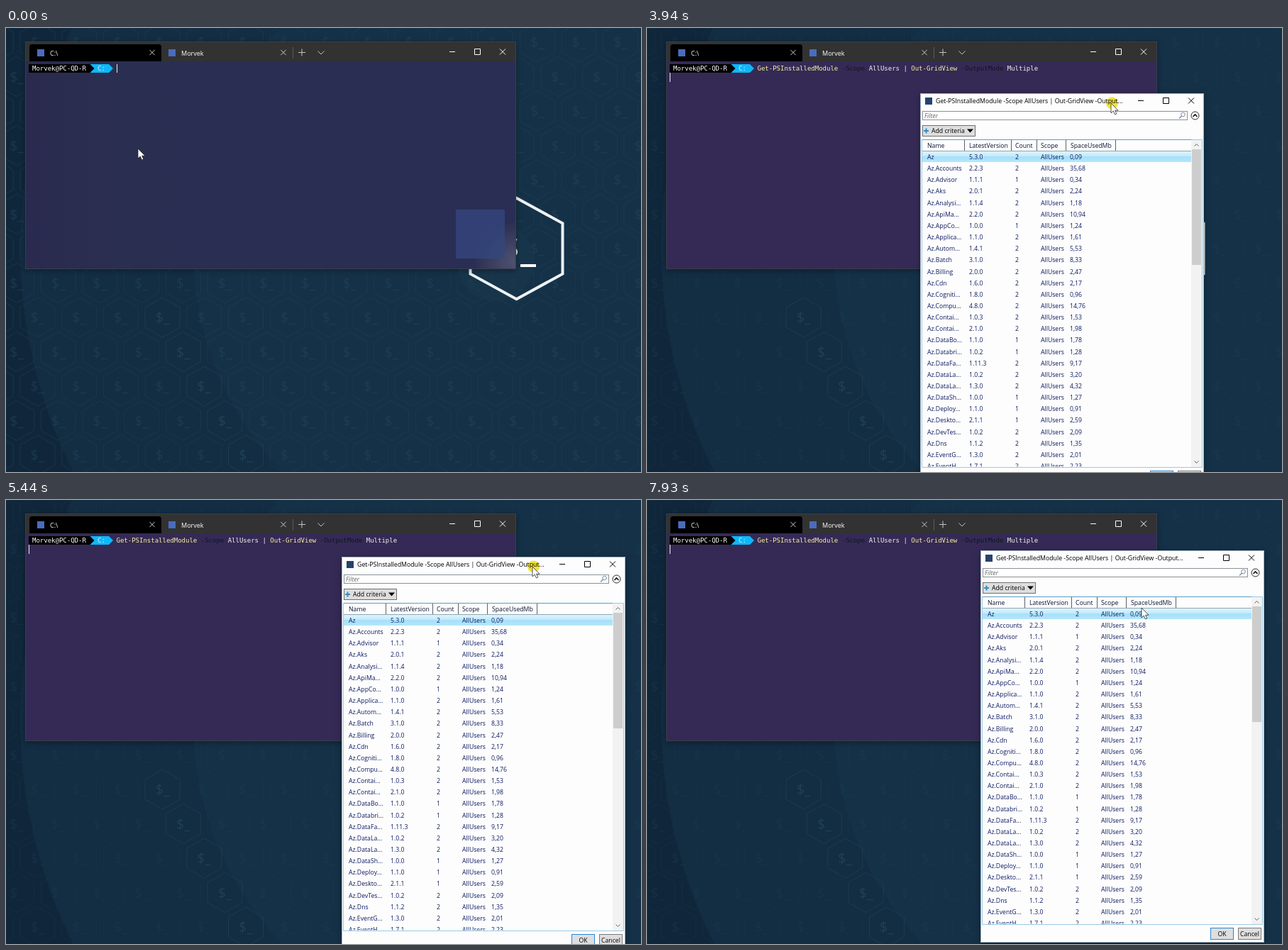
An HTML page that plays this animation: 895 by 626 pixels, repeating every 8 s.

```html
<!DOCTYPE html>
<html lang="en">
<head>
<meta charset="utf-8">
<title>Terminal and grid view</title>
<style>
  html, body { margin: 0; width: 100%; height: 100%; overflow: hidden; background: #10273b; }
  svg { display: block; }
  text { font-family: "Open Sans", "Noto Sans", sans-serif; font-size: 8.7px; white-space: pre; }
  .mono { font-family: "DejaVu Sans Mono", "Noto Sans Mono", monospace; font-size: 9px; }
  .line { fill: none; stroke-width: 1; }
</style>
</head>
<body>
<svg id="stage" width="895" height="626" viewBox="0 0 895 626">
  <defs>
    <linearGradient id="pick" x2="0" y2="1">
      <stop offset="0" stop-color="#def4fd"/><stop offset=".45" stop-color="#c2eafb"/>
      <stop offset=".5" stop-color="#a6e0fa"/><stop offset="1" stop-color="#b4e6fb"/>
    </linearGradient>
    <linearGradient id="acrylic">
      <stop offset="0" stop-color="#292c50"/><stop offset=".5" stop-color="#292f52"/>
      <stop offset="1" stop-color="#2c2f54"/>
    </linearGradient>
    <radialGradient id="glow">
      <stop offset="0" stop-color="#73748a" stop-opacity=".5"/>
      <stop offset="1" stop-color="#73748a" stop-opacity="0"/>
    </radialGradient>
    <filter id="shade" x="-10%" y="-10%" width="120%" height="120%">
      <feDropShadow dx="0" dy="2" stdDeviation="4" flood-opacity=".35"/>
    </filter>
    <clipPath id="term"><rect x="27" y="47" width="692" height="293"/></clipPath>
    <clipPath id="list"><rect x="3" y="66" width="380" height="460.5"/></clipPath>
  </defs>
</svg>
<script>
const LOOP = 8000;
const USER = 'Morvek', HOST = 'PC-QD-R';
const CHAR = 5.41, LINE_X = 155.5;
const YELLOW = '#f9f1a5', DIM = '#141726', PALE = '#f2f2f2';
const COMMAND = [['Get-PSInstalledModule', YELLOW], [' -Scope', DIM], [' AllUsers | ', PALE],
  ['Out-GridView', YELLOW], [' -OutputMode', DIM], [' Multiple', PALE]];
const MODULES = `Az 5.3.0 2 0,09|Az.Accounts 2.2.3 2 35,68|Az.Advisor 1.1.1 1 0,34|Az.Aks 2.0.1 2 2,24
Az.Analysi... 1.1.4 2 1,18|Az.ApiMa... 2.2.0 2 10,94|Az.AppCo... 1.0.0 1 1,24|Az.Applica... 1.1.0 2 1,61
Az.Autom... 1.4.1 2 5,53|Az.Batch 3.1.0 2 8,33|Az.Billing 2.0.0 2 2,47|Az.Cdn 1.6.0 2 2,17
Az.Cogniti... 1.8.0 2 0,96|Az.Compu... 4.8.0 2 14,76|Az.Contai... 1.0.3 2 1,53|Az.Contai... 2.1.0 2 1,98
Az.DataBo... 1.1.0 1 1,78|Az.Databri... 1.0.2 1 1,28|Az.DataFa... 1.11.3 2 9,17|Az.DataLa... 1.0.2 2 3,20
Az.DataLa... 1.3.0 2 4,32|Az.DataSh... 1.0.0 1 1,27|Az.Deploy... 1.1.0 1 0,91|Az.Deskto... 2.1.1 1 2,59
Az.DevTes... 1.0.2 2 2,09|Az.Dns 1.1.2 2 1,35|Az.EventG... 1.3.0 2 2,01|Az.EventH... 1.7.1 2 2,23`
  .split(/[|\n]/).map(row => row.split(' '));

const stage = document.getElementById('stage');

function add(parent, tag, attrs = {}, content) {
  const node = document.createElementNS('http://www.w3.org/2000/svg', tag);
  for (const key in attrs) node.setAttribute(key, attrs[key]);
  if (content !== undefined) node.textContent = content;
  parent.append(node);
  return node;
}
const group = (parent, attrs) => add(parent, 'g', attrs);
const box = (parent, x, y, width, height, fill, more) =>
  add(parent, 'rect', { x, y, width, height, fill, ...more });
const stroke = (parent, d, color, more) =>
  add(parent, 'path', { d, class: 'line', stroke: color, ...more });
const label = (parent, x, y, content, fill, more) =>
  add(parent, 'text', { x, y, fill, ...more }, content);
const cross = (x, y, r) => `M${x - r} ${y - r}l${2 * r} ${2 * r}m0 ${-2 * r}l${-2 * r} ${2 * r}`;
const show = (node, on) => node.setAttribute('visibility', on ? 'visible' : 'hidden');

// x is whole and y a half pixel, so that the lines stay crisp
function windowButtons(parent, x, y, color) {
  stroke(parent, `M${x - 4} ${y}h8`, color);
  stroke(parent, `M${x + 31.5} ${y - 4}h8v8h-8z`, color);
  stroke(parent, cross(x + 71, y, 4), color);
}

function hexPath(x, y, w, h) {
  return `M${x} ${y - h}l${w} ${h / 2}v${h}l${-w} ${h / 2}l${-w} ${-h / 2}v${-h}z`;
}

// Wallpaper: rings around the large hexagon, and a honeycomb of small ones
function drawWallpaper() {
  box(stage, 0, 0, 895, 626, '#10273b');
  add(stage, 'circle', { cx: 720, cy: 311, r: 700, fill: '#132d43' });
  add(stage, 'circle', { cx: 720, cy: 311, r: 457, fill: '#153147' });
  const faint = group(stage), bright = group(stage);
  for (let row = 0; row < 13; row++) {
    const y = 602 - row * 48.5;
    for (let col = -7; col < 12; col++) {
      const x = 338 + col * 58.7 + (row % 2 ? -29.4 : 0);
      const lit = row < 5 && col === -Math.floor(row / 2);
      const parent = lit ? bright : faint;
      const opacity = lit ? .8 : .55;
      stroke(parent, hexPath(x, y, 24.5, 28), '#204056', { opacity, 'stroke-width': 1.5 });
      label(parent, x, y + 7, '$_', '#23455c',
        { opacity, 'text-anchor': 'middle', style: 'font-size:20px' });
    }
  }
  add(stage, 'circle', { cx: 690, cy: 330, r: 55, fill: '#1a374e', opacity: .6 });
  stroke(stage, hexPath(719.5, 311, 65, 71.3), '#eef1f3', { style: 'stroke-width:4' });
  label(stage, 724, 325, '$', '#eef1f3', { 'text-anchor': 'end', style: 'font-size:44px' });
  box(stage, 725, 333, 22, 4, '#fff');
  return faint;
}

function commandLine(parent, parts) {
  const node = label(parent, LINE_X, 60, '', PALE, { class: 'mono' });
  for (const [content, fill] of parts) add(node, 'tspan', { fill }, content);
  return node;
}

function drawTerminal() {
  const term = group(stage, { filter: 'url(#shade)' });
  box(term, 27, 19, 692, 321, '#333');
  const focused = group(term, { 'clip-path': 'url(#term)' });
  box(focused, 27, 47, 692, 293, 'url(#acrylic)');
  add(focused, 'circle', { cx: 716, cy: 330, r: 55, fill: 'url(#glow)' });
  box(focused, 634, 256, 69, 69, '#34477c', { opacity: .8 });
  const blurred = group(term);
  box(blurred, 27, 47, 692, 293, '#342955');
  box(blurred, 634, 256, 69, 69, '#383468');
  stroke(term, 'M27.5 47V339.5H718.5V19.5H27.5Z', '#3b3d4c');

  add(term, 'path', { d: 'M33 47V27q0-4 4-4H215q4 0 4 4V47z', fill: '#000' });
  [[44, 62, 'C:\\', 206], [229, 247, USER, 391]].forEach(([icon, x, name, close]) => {
    box(term, icon, 30, 10, 10, '#496cbd');
    label(term, x, 38.5, name, '#fff', { style: 'font-size:9px' });
    stroke(term, cross(close, 34.5, 3.6), '#ccc');
  });
  stroke(term, 'M404.5 27V43', '#5a5a5a');
  stroke(term, 'M412 34.5h10m-5-5v10M439.5 32.5l4.5 4.5 4.5-4.5', '#c4c4c4');
  windowButtons(term, 629, 33.5, '#fff');

  add(term, 'path', { d: 'M118 51H145L151 57 145 63H118z', fill: '#0bb8f9' });
  add(term, 'path', { d: 'M32 51H118.5L124.5 57 118.5 63H32z', fill: '#000' });
  label(term, 37, 60, `${USER}@${HOST}`, '#fff', { class: 'mono' });
  label(term, 129, 60, 'C:', '#e4f5fd', { class: 'mono' });

  const whole = COMMAND.map(part => part[0]).join('');
  const guess = n => commandLine(term, [[whole.slice(0, n), YELLOW], [whole.slice(n), DIM]]);
  const states = [guess(1), guess(2), commandLine(term, COMMAND)];
  const caret = box(term, 156, 51, 1, 12, '#eee');
  return { focused, blurred, states, caret };
}

function drawGrid() {
  const grid = group(stage);
  box(grid, 0, 0, 400, 553, '#fdfdfd', { filter: 'url(#shade)' });
  stroke(grid, 'M.5 .5H399.5V552.5H.5z', '#5d7f9c', { opacity: .6 });
  box(grid, 7, 6, 10, 10, '#26426b');
  label(grid, 22, 14, 'Get-PSInstalledModule -Scope AllUsers | Out-GridView -Output...', '#000',
    { style: 'font-size:8.78px' });
  windowButtons(grid, 311, 10.5, '#000');

  box(grid, 3.5, 25.5, 373, 12, '#fff', { stroke: '#8b9097' });
  label(grid, 6, 35, 'Filter', '#666', { 'font-style': 'italic' });
  add(grid, 'circle', { cx: 370.5, cy: 30, r: 2.8, class: 'line', stroke: '#7d8ba4' });
  stroke(grid, 'M368.5 32l-3.5 3.5', '#7d8ba4', { style: 'stroke-width:1.5' });
  add(grid, 'circle', { cx: 387.5, cy: 31.5, r: 5.5, class: 'line', stroke: '#222' });
  stroke(grid, 'M384.5 33l3-3 3 3', '#111', { style: 'stroke-width:1.6' });

  box(grid, 3.5, 45.5, 74, 15, '#dedede', { stroke: '#707070' });
  stroke(grid, 'M5 53h7m-3.5-3.5v7', '#2d8fd0', { style: 'stroke-width:2' });
  label(grid, 16, 56, 'Add criteria', '#000');
  add(grid, 'path', { d: 'M66 50.5h9l-4.5 5z', fill: '#000' });

  stroke(grid, 'M2.5 65.5H397.5V527.5H2.5z', '#9ccbe4');
  stroke(grid, 'M3 65.5H382', '#5b9cc4');
  stroke(grid, 'M3 81.5H382', '#8fa6b4');
  const columns = [10, 69, 134, 170, 212];
  ['Name', 'LatestVersion', 'Count', 'Scope', 'SpaceUsedMb'].forEach((name, i) =>
    label(grid, columns[i], 77, name, '#0a1330'));
  stroke(grid, [62.5, 128.5, 164.5, 205.5, 275.5].map(x => `M${x} 66V81`).join(''), '#5c6168');
  const list = group(grid, { 'clip-path': 'url(#list)' });
  box(list, 3, 82, 379, 15, 'url(#pick)');
  MODULES.forEach(([name, version, count, space], i) => {
    const y = Math.round(93 + i * 16.15);
    [name, version, count, 'AllUsers', space].forEach((cell, c) =>
      label(list, columns[c] - (c === 4 ? 1 : 0), y, cell, '#0c1a62'));
  });

  box(grid, 382, 66, 15, 461, '#f2f2f2');
  box(grid, 383, 79, 13, 163, '#cdcdcd');
  stroke(grid, 'M386.5 74.5l3-3 3 3M386.5 518.5l3 3 3-3', '#606060');

  [[324.5, 'OK', '#2f86d1'], [363.5, 'Cancel', '#7b7b7b']].forEach(([x, name, edge]) => {
    box(grid, x, 532.5, 32, 16, '#dedede', { stroke: edge });
    label(grid, x + 16, 544, name, '#000', { 'text-anchor': 'middle' });
  });
  return grid;
}

// Each move: start, end, number of steps, x and y reached
const GRID_START = [-169, -34];
const GRID_MOVES = [
  [3560, 3630, 2, 28, 40], [3870, 4010, 3, 430, 99], [4310, 4720, 7, 471, 90],
  [4930, 5440, 8, 473, 80], [5620, 5690, 2, 473, 76], [5940, 6310, 6, 472, 57],
  [6490, 6750, 4, 471, 68], [6930, 7050, 3, 470, 71]];
const POINTER_MOVES = [[7540, 7930, 7, 697, 152]];

function place(moves, t, x, y) {
  for (const [start, end, steps, toX, toY] of moves) {
    if (t < start) break;
    const part = (t - start) / (end - start);
    const step = t >= end ? steps : 1 + Math.floor(part * (steps - 1) + .1);
    const eased = 1 - (1 - step / steps) ** 2;
    x += (toX - x) * eased;
    y += (toY - y) * eased;
  }
  return [Math.round(x), Math.round(y)];
}

const faint = drawWallpaper();
const { focused, blurred, states, caret } = drawTerminal();
const grid = drawGrid();
const halo = add(stage, 'circle', { r: 8.5, fill: '#f3e43c', style: 'mix-blend-mode:multiply' });
const pointer = add(stage, 'path', { d: 'M0 0V14L3.2 11 5.5 16 7.8 15 5.6 10.2H10Z',
  fill: '#fff', stroke: '#111', 'stroke-width': .7 });

function setCaret(t) {
  const entered = t >= 2250;
  const typed = t < 620 ? 0 : t < 810 ? 1 : t < 1680 ? 2 : 76.7;
  caret.setAttribute('x', entered ? 32 : Math.round(156 + typed * CHAR));
  caret.setAttribute('y', entered ? 63 : 51);
  caret.setAttribute('height', entered ? 13 : 12);
  const off = [[1370, 1680], [2180, 2250], [2870, 3240]].some(([a, b]) => t >= a && t < b);
  show(caret, !off);
}

function draw(t) {
  const active = t < 3240, open = t >= 3490;
  show(focused, active);
  show(blurred, !active);
  faint.setAttribute('opacity', t < 3870 ? 1 : .55);
  const state = t < 620 ? -1 : t < 810 ? 0 : t < 1680 ? 1 : 2;
  states.forEach((node, i) => show(node, i === state));
  setCaret(t);

  const [gx, gy] = place(GRID_MOVES, t, ...GRID_START);
  show(grid, open);
  grid.setAttribute('transform', `translate(${gx} ${gy})`);
  const [px, py] = open ? place(POINTER_MOVES, t, gx + 269, gy + 14) : [186, 170];
  show(pointer, t < 620 || t >= 2180);
  pointer.setAttribute('transform', `translate(${px} ${py})`);
  show(halo, open && t < 7300);
  halo.setAttribute('cx', gx + 270.5);
  halo.setAttribute('cy', gy + 14);
}

const begin = performance.now();
function tick() {
  draw((performance.now() - begin) % LOOP);
  requestAnimationFrame(tick);
}
tick();
</script>
</body>
</html>
```
